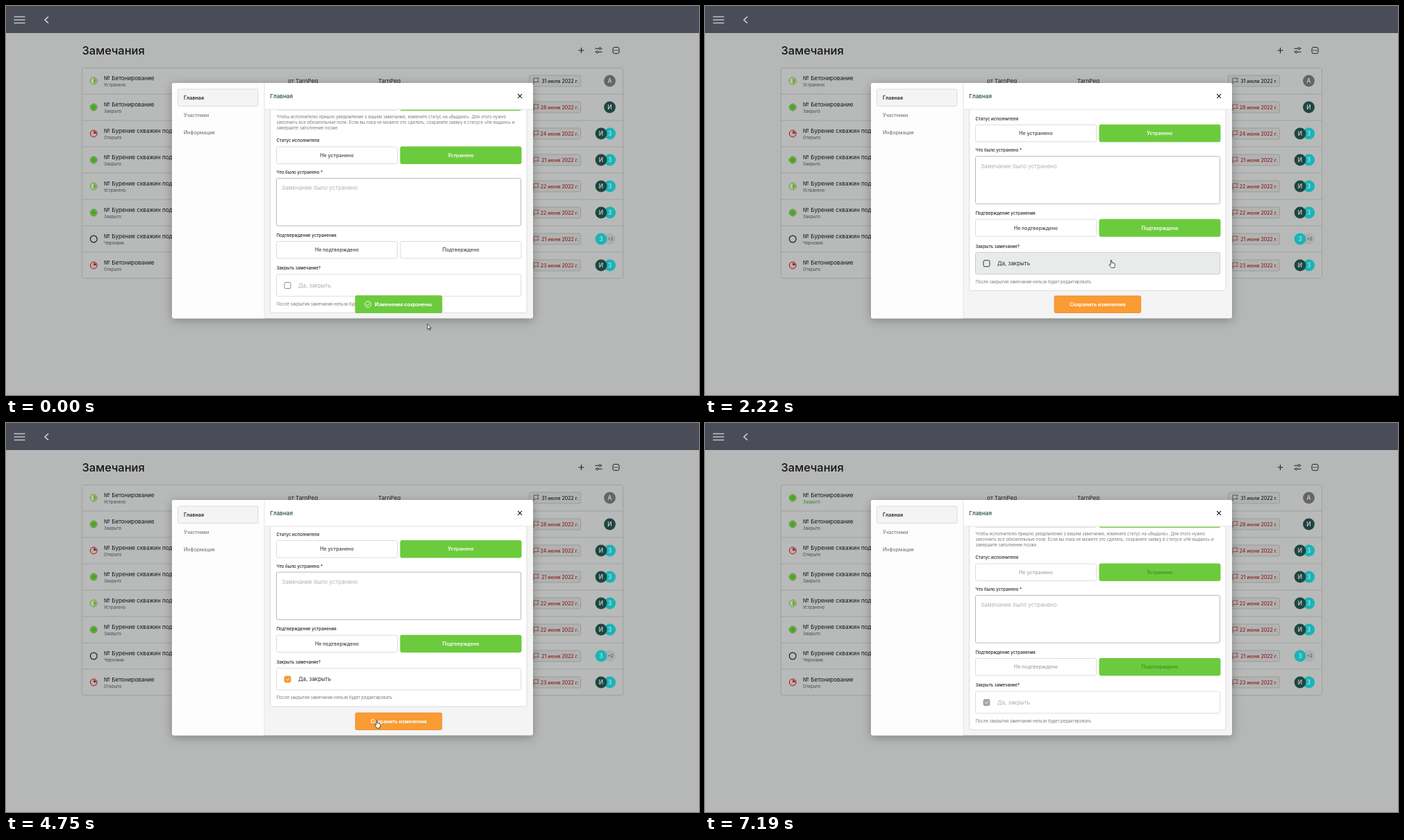
Recreate the animation shown at these times as an HTML page. Size 998x561 px, loop 7.35 s.

```html
<!DOCTYPE html>
<html lang="ru">
<head>
<meta charset="utf-8">
<style>
html, body { margin: 0; width: 100%; height: 100%; overflow: hidden; background: #b6b7b7; }
svg { display: block; width: 998px; height: 561px; font-family: Inter, "Open Sans", sans-serif; }
text { white-space: pre; }
#modal { filter: drop-shadow(0 3px 7px rgba(0, 0, 0, .28)); }
</style>
</head>
<body>
<svg id="stage" viewBox="0 0 998 561"></svg>
<script>
const LOOP = 7350;
const GREEN = '#6bcb3d';

// Markup helpers
const text = (x, y, size, str, attrs = '') =>
  `<text x="${x}" y="${y}" font-size="${size}" ${attrs}>${str}</text>`;
const rect = (x, y, w, h, fill, attrs = '') =>
  `<rect x="${x}" y="${y}" width="${w}" height="${h}" fill="${fill}" ${attrs}/>`;
const circle = (x, y, r, fill, attrs = '') =>
  `<circle cx="${x}" cy="${y}" r="${r}" fill="${fill}" ${attrs}/>`;
const line = (d, color, width = 1, attrs = '') =>
  `<path d="${d}" fill="none" stroke="${color}" stroke-width="${width}" ${attrs}/>`;
const middle = 'text-anchor="middle"';

// Page behind the dialog
const icons = {
  half: (x, y) => circle(x, y, 4.9, '#b8c4ac', 'stroke="#5d9a22"') +
    `<path d="M${x} ${y - 3.4}a3.4 3.4 0 0 1 0 6.8z" fill="#6aa62a"/>`,
  full: (x, y) => circle(x, y, 4.9, '#a9bd9b', 'stroke="#3f8f1d"') + circle(x, y, 3.7, '#4aa51f'),
  open: (x, y) => circle(x, y, 4.9, '#c0a9a7', 'stroke="#8f1f1c"') +
    `<path d="M${x} ${y}v-3.6a3.6 3.6 0 0 1 3.6 3.6z" fill="#8f1f1c"/>`,
  draft: (x, y) => circle(x, y, 4.9, 'none', 'stroke="#222" stroke-width="1.2"')
};

const concrete = '№ Бетонирование', drilling = '№ Бурение скважин под';
const rows = [
  [concrete, 'Устранено', 'half', '31 июля', 'А'],
  [concrete, 'Закрыто', 'full', '28 июня', 'И'],
  [drilling, 'Открыто', 'open', '24 июня', 'ИЗ'],
  [drilling, 'Закрыто', 'full', '21 июня', 'ИЗ'],
  [drilling, 'Устранено', 'half', '22 июня', 'ИЗ'],
  [drilling, 'Закрыто', 'full', '22 июня', 'ИЗ'],
  [drilling, 'Черновик', 'draft', '21 июня', 'З+'],
  [concrete, 'Открыто', 'open', '23 июня', 'ИЗ']
];

function avatar(letter, x, y) {
  const fill = { А: '#656565', И: '#204641', З: '#18b5b8', '+': '#adaeae' }[letter];
  const label = letter === '+'
    ? text(x + 1, y + 2.3, 6.5, '+2', middle + ' fill="#444"')
    : text(x, y + 3, 8.3, letter, middle + ' fill="#d5dada" font-weight="500"');
  return circle(x, y, 8.4, fill) + label;
}

function listRow([name, status, icon, date, people], i) {
  const y = 108 + 38 * i;
  const ink = i ? '#8c1c1a' : '#1c1c1c';
  const state = (kind, word, attrs, id) => `<g id="${id}">` + icons[kind](126.3, y) +
    text(141, y + 8.3, 6.1, word, attrs) + '</g>';
  const faces = people.length > 1
    ? avatar(people[1], 869.7, y) + avatar(people[0], 857, y)
    : avatar(people, 869.5, y);
  return (i ? line(`M110 ${y - 19}H888`, '#9fa0a0') : '') +
    text(141, y - 1, 8.15, name, 'fill="#151515"') +
    state(icon, status, 'fill="#484848"', 'state' + i) +
    (i ? '' : state('full', 'Закрыто', 'fill="#2f8a18"', 'closed')) +
    rect(753.5, y - 8, 74, 16, '#b1b2b2', 'rx="2" stroke="#9b9b9b"') +
    line(`M760 ${y + 5}V${y - 4}H767.5L765.5 ${y - 1.2} 767.5 ${y + 1.6}H760`, i ? '#8a3b33' : '#3c3c3c', .8) +
    text(824.5, y + 2.5, 7, date + ' 2022 г.', `text-anchor="end" font-weight="500" fill="${ink}"`) +
    faces;
}

const page =
  rect(0, 0, 998, 561, '#b6b7b7') +
  rect(0, 0, 998, 39, '#4a4d58') +
  line('M11.5 15.5H27.5M11.5 20H27.5M11.5 24.5H27.5', '#c3c4c7', 1.7) +
  line('M61 15.3L56 20 61 24.7', '#c9cacd', 1.7) +
  text(109.5, 70, 16.5, 'Замечания', 'font-weight="500" fill="#151515"') +
  line('M824.5 64H832.5M828.5 60V68', '#222', 1.1) +
  line('M848.5 61.3H858.5M848.5 66.3H858.5', '#222', 1) +
  circle(855.5, 61.3, 1.5, '#b6b7b7', 'stroke="#222"') +
  circle(851.5, 66.3, 1.5, '#b6b7b7', 'stroke="#222"') +
  rect(874, 59.5, 9, 9, 'none', 'rx="2.3" stroke="#222"') +
  [876.2, 878.5, 880.8].map(x => circle(x, 64, .7, '#222')).join('') +
  rect(109.5, 89.5, 779, 303, '#b8b9b9', 'rx="2" stroke="#9fa0a0"') +
  text(406, 111, 8.2, 'от TarnPeg', 'fill="#222"') +
  text(536, 111, 8.2, 'TarnPeg', 'fill="#222"') +
  rows.map(listRow).join('');

// Dialog content
const label = (y, str) => text(389.5, y, 6.15, str, 'fill="#222" font-weight="500"');
const box = (x, y, w, h, attrs = '') =>
  rect(x, y, w, h, '#fff', `rx="2" stroke="#dcdcdc" ${attrs}`);
const button = (x, y, str, id, on) =>
  rect(x, y, 174, 24.5, on ? GREEN : '#fff', `rx="2" stroke="${on ? GREEN : '#dcdcdc'}" id="${id}"`) +
  text(x + 87, y + 14.8, 7.05, str, `${middle} font-weight="600" id="${id}Text" fill="${on ? '#fff' : '#555'}"`);

const note = [
  'Чтобы исполнителю пришло уведомление о вашем замечание, измените статус на «Выдано». Для этого нужно',
  'заполнить все обязательные поля. Если вы пока не можете это сделать, сохраните заявку в статусе «Не выдано» и',
  'завершите заполнение позже.'
];

const content =
  box(380.5, 100, 369.5, 342.3, 'stroke="#e4e4e4"') +
  box(389.5, 126, 174, 24.5) + rect(567.5, 126, 174.5, 25, GREEN, 'rx="2"') +
  note.map((s, i) => text(389.5, 161.6 + 8.2 * i, 6, s, 'fill="#777"')).join('') +
  label(196.3, 'Статус исполнителя') +
  button(389.5, 203, 'Не устранено', 'notFixed') + button(568, 203, 'Устранено', 'fixed', true) +
  label(242.2, 'Что было устранено *') +
  box(389.5, 248.5, 352, 68.5, 'style="stroke:#b9b9b9"') +
  text(397, 265.3, 8.05, 'Замечание было устранено', 'fill="#b2b2b2"') +
  label(332.8, 'Подтверждение устранения') +
  button(389.5, 339.5, 'Не подтверждено', 'notOk') + button(568, 339.5, 'Подтверждено', 'ok') +
  label(380.3, 'Закрыть замечание?') +
  box(389.5, 387, 352, 31.5, 'id="row"') +
  rect(401, 398.5, 9, 9, '#fff', 'rx="2" id="check"') +
  line('M403.5 403L405 404.6 407.7 401.6', '#fff', 1, 'id="tick"') +
  text(421, 405.8, 7.95, 'Да, закрыть', 'id="rowText"') +
  text(389.5, 431.6, 6, 'После закрытия замечания нельзя будет редактировать', 'fill="#777"');

const toast =
  rect(503.2, 418, 124.5, 24.5, '#fa9b33', 'rx="2" stroke="#df8a2c" stroke-width=".8"') +
  text(565.4, 432.9, 7.1, 'Сохранить изменения', `${middle} font-weight="700" fill="#fff"`) +
  `<g id="saved">` + rect(502.8, 417.6, 125.3, 25.3, GREEN, 'rx="2"') +
  circle(521.3, 430.2, 4.3, 'none', 'stroke="#fff" stroke-width=".9"') +
  line('M519.3 430.3L520.8 431.8 523.6 428.8', '#fff', .9) +
  text(531, 432.8, 7.1, 'Изменения сохранены', 'font-weight="700" fill="#fff"') + '</g>';

const modal =
  `<g id="modal">${rect(239, 111, 520, 339.5, '#f4f4f4', 'rx="3"')}</g>` +
  `<g clip-path="url(#body)"><g id="scroll">${content}</g></g>` +
  `<path d="M372 111H756a3 3 0 0 1 3 3V149H372z" fill="#fff"/>` +
  `<path d="M372 111H242a3 3 0 0 0-3 3V447.5a3 3 0 0 0 3 3H372z" fill="#fdfdfd"/>` +
  line('M372 149H759M372 111V450', '#e4e4e4') +
  rect(247.5, 120, 115.5, 24.5, '#f4f4f4', 'rx="2" stroke="#dcdcdc"') +
  text(256, 134.6, 7.1, 'Главная', 'font-weight="600" fill="#222"') +
  text(256, 159.6, 7.15, 'Участники', 'fill="#666"') +
  text(256, 184.6, 7.1, 'Информация', 'fill="#666"') +
  text(380.3, 132.9, 8.1, 'Главная', 'font-weight="500" fill="#1d4a3c"') +
  line('M737.2 127L743 132.8M743 127L737.2 132.8', '#222', 1.1) +
  `<g clip-path="url(#body)"><g id="toast">${toast}</g></g>`;

const cursor = `<g id="cursor" stroke="#222" stroke-width=".8" fill="#fff" stroke-linejoin="round">
  <path id="arrow" d="M.5 .5V8.4L2.2 6.9 3.5 9.8 4.7 9.2 3.4 6.5H5.8Z"/>
  <path id="hand" d="M2.6 1.4Q3.4 .2 4.2 1.4V4.8Q8.6 4.8 8.7 6.8V9L7.7 12H3.7L.6 8.2Q.2 6.4 2.6 7.4Z"/></g>`;

document.getElementById('stage').innerHTML =
  '<defs><clipPath id="body"><rect x="372" y="149.5" width="387" height="301"/></clipPath></defs>' +
  page + modal + cursor;

// Motion
const el = id => document.getElementById(id);
const set = (id, attrs) => {
  for (const name in attrs) el(id).setAttribute(name, attrs[name]);
};
const ramp = (t, a, b) => Math.min(1, Math.max(0, (t - a) / (b - a)));
const easeOut = p => 1 - (1 - p) ** 3;
const within = (t, ...spans) => spans.some(([a, b]) => t >= a && t < b);
const show = (id, on) => set(id, { opacity: +on });
const mix = (a, b, p) => `rgb(${a.map((v, i) => Math.round(v + (b[i] - v) * p))})`;
const gray = v => [v, v, v];
const lime = [107, 203, 61];
const white = gray(255);

// Time, x, y of the pointer
const path = [
  [0, 606.5, 458], [30, 606.5, 458], [300, 682, 364], [570, 674, 349.5], [1600, 674, 349.5],
  [1950, 593, 366], [2070, 590, 366], [2220, 582, 365.5], [2680, 434, 368], [3350, 434, 370],
  [3470, 469, 396.3], [3620, 497, 413], [3970, 530.5, 428], [6650, 530.5, 428], [6790, 13, 470], [LOOP, 13, 470]
];

function pointer(t) {
  const i = path.findIndex(k => k[0] > t);
  const [t0, x0, y0] = path[i - 1], [t1, x1, y1] = path[i];
  const p = (t - t0) / (t1 - t0);
  return [x0 + (x1 - x0) * p, y0 + (y1 - y0) * p];
}

function draw(t) {
  const saved = t >= 4960;
  const disabled = ramp(t, 4960, 5200);
  const dimGreen = ramp(t, 5390, 5520);

  const scroll = easeOut(ramp(t, 2070, 2310)) - easeOut(ramp(t, 4960, 5310));
  set('scroll', { transform: `translate(0 ${-33.4 * scroll})` });

  const hidden = t < 1300 ? ramp(t, 960, 1080)
    : t < 6000 ? 1 - easeOut(ramp(t, 1730, 2010))
    : ramp(t, 7070, 7190);
  set('toast', { transform: `translate(0 ${34 * hidden})` });
  set('saved', { opacity: t < 1300 ? 1 : ramp(t, 4900, 5080) });

  // Confirmation button: pressed, then filled
  const pressed = ramp(t, 1300, 1430), filled = ramp(t, 1440, 1680);
  const okFill = filled ? mix([239, 241, 237], lime, filled) : mix(white, [239, 241, 237], pressed);
  set('ok', { fill: okFill, stroke: pressed ? okFill : '#dcdcdc' });
  const dim = [72, 143, 42];
  set('okText', { fill: dimGreen ? mix(white, dim, dimGreen) : mix(gray(85), white, pressed) });
  set('fixedText', { fill: mix(white, dim, dimGreen) });
  for (const id of ['notFixedText', 'notOkText']) set(id, { fill: mix(gray(85), gray(172), disabled) });

  // Closing row with its checkbox
  const hover = ramp(t, 2100, 2210) - ramp(t, 3450, 3700);
  set('row', { fill: mix(white, [233, 234, 234], hover), stroke: mix(gray(222), gray(205), hover) });
  const checked = ramp(t, 2810, 2960);
  const orange = [246, 154, 52];
  const active = t >= 1300;
  set('check', {
    fill: saved ? mix(orange, gray(165), disabled) : mix(mix3(hover), orange, checked),
    stroke: saved ? mix(orange, gray(165), disabled) : mix(gray(active ? 50 : 140), orange, checked)
  });
  set('tick', { opacity: checked });
  set('rowText', { fill: active ? mix(gray(40), gray(172), disabled) : '#acacac' });

  show('state0', !saved);
  show('closed', saved);

  const hand = within(t, [770, 1640], [2130, 3420], [4090, 6680]);
  const [x, y] = pointer(t);
  set('cursor', { transform: `translate(${x} ${y})`, opacity: t < 6820 ? 1 : 0 });
  show('hand', hand);
  show('arrow', !hand);
}

// Empty checkbox takes the colour of its row
function mix3(hover) {
  return [255 - 22 * hover, 255 - 21 * hover, 255 - 21 * hover];
}

// Blend outer colours only from plain triples
function frame() {
  draw(performance.now() % LOOP);
  requestAnimationFrame(frame);
}
frame();
</script>
</body>
</html>
```
